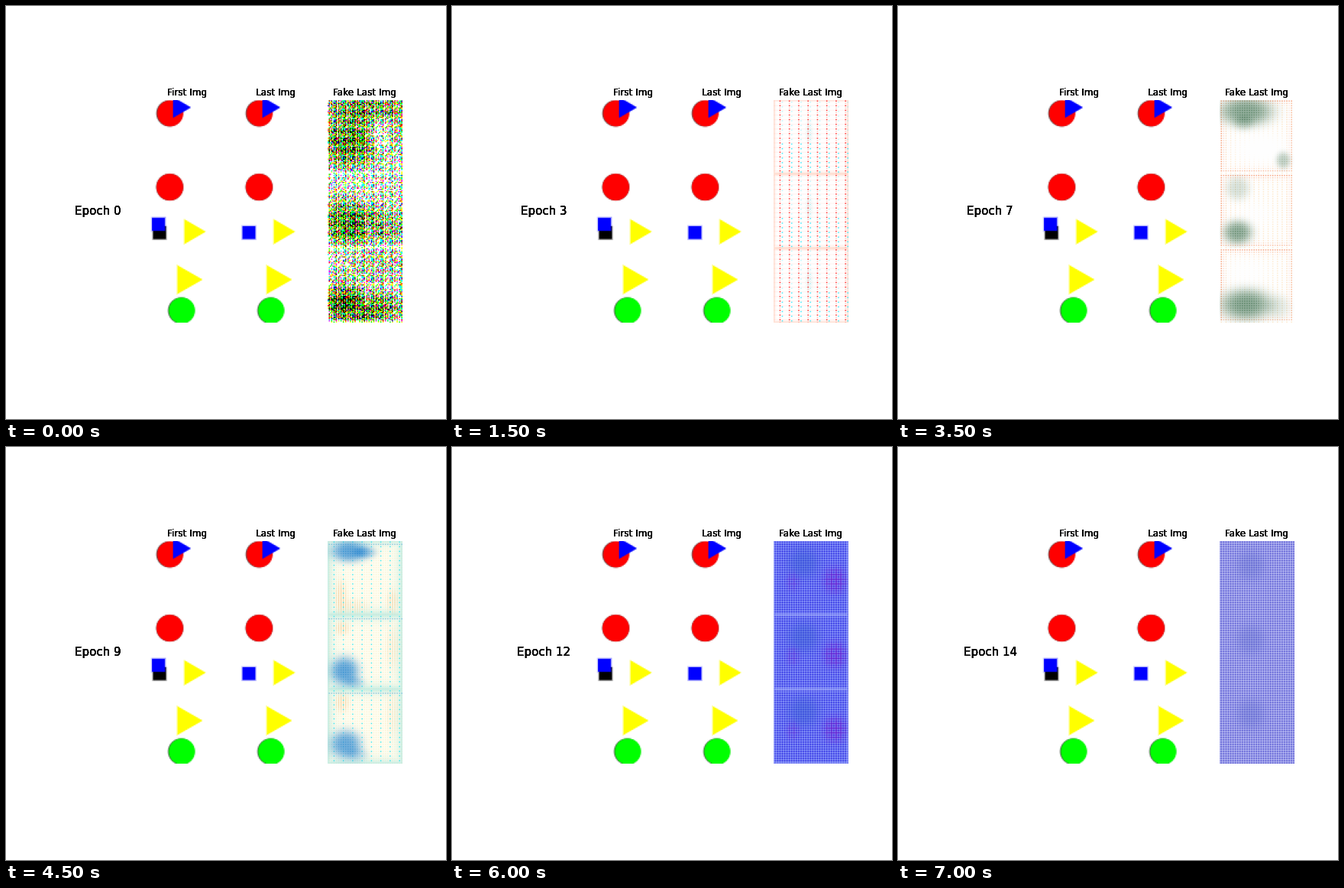
Write a matplotlib script that moves like this. It is 576 px wide and 540 px high and loops after 7500 ms.

```python
import numpy as np
import matplotlib.pyplot as plt
from matplotlib.animation import FuncAnimation

W, H, DPI = 576, 540, 72
N, EPOCHS = 64, 15
SIDE = 97.04
TOP = 123
PITCH = SIDE * 1.2
SCALE = SIDE / N

Y, X = np.mgrid[0:3 * N, 0:N]
V = Y % N
RED, GREEN, BLUE, YELLOW, BLACK = (1, 0, 0), (0, 1, 0), (0, 0, 1), (1, 1, 0), (0, 0, 0)


# --- shape column -----------------------------------------------------------
def paint(img, cover, color):
    c = np.clip(cover, 0, 1)[..., None]
    img[:] = img * (1 - c) + c * np.array(color, float)


def disc(img, x, y, r, color, shade=0.6):
    def cover(dx, rad):
        return rad + 0.5 - np.hypot(X + 0.5 - x - dx, Y + 0.5 - y)
    paint(img, np.clip(cover(-shade, r + 0.1), 0, 1) * 0.7, BLACK)
    paint(img, cover(0, r), color)


def square(img, x, y, s, color):
    dx = s / 2 + 0.5 - abs(X + 0.5 - x)
    dy = s / 2 + 0.5 - abs(Y + 0.5 - y)
    paint(img, np.minimum(dx, dy), color)


def triangle(img, x, y, w, h, color, top=0):
    """Pointing right; (x, y) is the middle of the left side."""
    px = X + 0.5 - x
    left = px + 0.5
    slant = (1 - px / w) * h / 2 - abs(Y + 0.5 - y) + 0.5
    paint(img, np.where(Y >= top, np.minimum(left, slant), 0), color)


def scene(first):
    img = np.ones((3 * N, N, 3))
    disc(img, 17.6, 12.1, 11.2, RED)
    triangle(img, 20, 7, 15.5, 18, BLUE)
    disc(img, 17.3, 75.5, 11.5, RED, 0.1)
    if first:
        square(img, 8.5, 114.7, 11.5, BLACK)
        square(img, 7.6, 107.4, 11.5, BLUE)
    else:
        square(img, 8.5, 114.6, 11.5, BLUE)
    triangle(img, 29.6, 113.8, 18.5, 21.6, YELLOW)
    triangle(img, 23.6, 155, 21.8, 25, YELLOW)
    disc(img, 27.6, 181.6, 11.2, GREEN)
    return img


# --- generated column -------------------------------------------------------
def field(*rows):
    """One list of (x, y, rx, ry, weight) soft blobs per cell."""
    out = np.zeros((3 * N, N))
    for i, blobs in enumerate(rows):
        for x, y, rx, ry, weight in blobs:
            d = ((X - x) / rx) ** 2 + ((V - y) / ry) ** 2
            out += weight * np.exp(-d ** 1.5) * (Y // N == i)
    return out


def grain(seed, size, rough=0.0):
    rng = np.random.default_rng(seed)
    tile = rng.random((size, size, 3))
    full = np.tile(tile, (3 * N // size, N // size, 1))
    return full + rough * rng.normal(size=full.shape)


def edge(width):
    d = np.minimum(np.minimum(X, N - 1 - X), np.minimum(V, N - 1 - V))
    return np.exp(-d / width)


def ink(img, amount, color):
    a = np.clip(amount, 0, 1)[..., None]
    return img * (1 - a) + a * np.array(color, float)


def confetti():
    dark = 0.24 + field(
        [(18, 36, 26, 22, 0.42), (30, 6, 36, 12, 0.3), (58, 22, 6, 22, 0.12), (43, 32, 8, 12, -0.2)],
        [(14, 42, 22, 20, 0.4), (45, 44, 26, 16, 0.22), (33, 46, 5, 8, -0.2)],
        [(28, 50, 36, 14, 0.42), (12, 40, 16, 16, 0.2), (40, 16, 24, 14, 0.1), (33, 42, 5, 7, -0.2)])
    weight = np.where(X[..., None] % 2 == 1, 1.25, 0.8) * np.array([0.92, 0.85, 1.25])
    off = dark[..., None] * weight > grain(4, 8, 0.12)
    corner = np.hypot(np.maximum(abs(X - 31.5) - 24, 0), np.maximum(abs(V - 29.5) - 24, 0)) > 8
    off[corner & (X % 2 == 0)] = False
    return 1.0 - off


def dotted():
    img = np.ones((3 * N, N, 3))
    img = ink(img, 0.3 * edge(0.8), (1, 0.6, 0.45))
    img = ink(img, 0.07 * (V % 4 == 1), (1, 0.5, 0.4))
    smudge = field(*[[(30, 28, 3, 10, 0.3)]] * 3)
    img = ink(img, smudge * ((X + Y) % 2), (0.6, 0.8, 0.8))
    img = ink(img, 0.9 * ((X % 8 == 5) & (V % 4 == 1)), (1, 0.1, 0.1))
    img = ink(img, 0.35 * ((X % 8 == 5) & (V % 4 == 3)), (1, 0.4, 0.3))
    low = 0.25 + 0.5 * (V > 34)
    return ink(img, low * ((X % 8 == 7) & (V % 4 == 2)), (0, 0.9, 1))


def olive():
    dark = field(
        [(16, 7, 24, 21, 1), (17, 35, 4, 3, 0.3)],
        [(16, 10, 23, 19, 1), (18, 42, 12, 22, 0.4)],
        [(17, 52, 24, 16, 1), (18, 27, 11, 10, 0.3), (20, 2, 30, 3, 0.2)])
    gap = np.where((X % 2 == 1) & (V % 2 == 1), 1.25, 0.6)
    strength = np.clip(dark * gap, 0, 1)[..., None]
    img = 1 - strength * grain(11, 4, 0.05) * np.array([0.85, 0.7, 1.0])
    img = ink(img, 0.4 * ((V == 1) & (X % 2 == 1)), (1, 0.4, 0.3))
    return ink(np.clip(img, 0, 1), 0.08 * edge(0.8), (1, 0.6, 0.5))


def moss():
    img = np.ones((3 * N, N, 3))
    pale = 0.3 + field([(36, 42, 26, 16, -0.3)], [(30, 34, 14, 12, -0.2)], [(22, 20, 20, 14, -0.25)])
    img = ink(img, pale * ((X % 4 == 1) & (V % 2 == 1)), (1, 0.72, 0.35))
    inside = (X < 62) & (V < 62)
    rim = edge(2.2) * inside * (X % 2 == 1) * (V % 2 == 1)
    img = ink(img, 0.9 * rim, (0.95, 0.4, 0.2))
    dark = field(
        [(22, 10, 22, 12, 0.75), (20, 20, 8, 6, 0.2), (54, 52, 6, 7, 0.4)],
        [(15, 12, 10, 10, 0.25), (15, 50, 12, 10, 0.72)],
        [(22, 48, 21, 13, 0.78), (50, 50, 10, 10, 0.15)])
    gap = np.where((X % 2 == 1) & (V % 2 == 1), 1.2, 0.8)
    return ink(img, dark * gap, (0.3, 0.48, 0.36))


def sky():
    img = np.ones((3 * N, N, 3)) * np.array([1, 0.995, 0.95])
    img = ink(img, 0.3 * ((X % 2 == 1) & (V % 2 == 1)), (0.98, 0.88, 0.6))
    img = ink(img, 0.5 * edge(3.5), (0.6, 0.88, 0.85))
    warm = field(
        [(11, 48, 5, 14, 0.5), (22, 56, 12, 6, 0.3), (55, 52, 5, 10, 0.4)],
        [(12, 11, 6, 6, 0.5), (55, 28, 6, 18, 0.25)],
        [(12, 11, 6, 8, 0.5), (55, 20, 6, 20, 0.2)])
    img = ink(img, warm * (X % 2), (0.95, 0.72, 0.45))
    img = ink(img, 0.55 * ((V == 3) & (X % 2 == 1)), (0.3, 0.65, 0.85))
    img = ink(img, 0.8 * ((X % 8 == 5) & (V % 4 == 1)), (0.1, 0.9, 0.95))
    dark = field(
        [(18, 9, 15, 9, 0.85), (32, 10, 9, 5, 0.4)],
        [(14, 48, 12, 12, 0.85), (23, 58, 8, 5, 0.3)],
        [(15, 47, 13, 12, 0.8), (25, 56, 9, 6, 0.25)])
    gap = np.where((X % 2 == 1) & (V % 2 == 1), 1.1, 0.85)
    return ink(img, dark * gap, (0.2, 0.55, 0.82))


def mesh(base, dot, line):
    img = np.ones((3 * N, N, 3)) * np.array(base, float)
    img = ink(img, 1.0 * ((X % 2 == 1) & (V % 2 == 1)), dot)
    return ink(img, 0.8 * ((X % 2 == 0) & (V % 2 == 0)), line)


def violet():
    img = mesh((0.4, 0.44, 0.96), (0.2, 0.2, 0.88), (0.62, 0.68, 0.98))
    img = ink(img, 0.45 * edge(0.7), (0.7, 0.75, 1))
    cool = field(*[[(25, 19, 13, 13, 0.45)]] * 3)
    img = ink(img, cool, (0.22, 0.38, 0.82))
    hot = field(*[[(52, 34, 10, 11, 0.75), (16, 35, 6, 8, 0.35)]] * 3)
    return ink(img, hot * np.where((X % 4 == 1) | (V % 4 == 1), 0.9, 0.3), (0.45, 0.08, 0.8))


def lavender():
    img = mesh((0.6, 0.61, 0.92), (0.36, 0.36, 0.82), (0.78, 0.79, 0.96))
    cool = field(*[[(26, 21, 12, 13, 0.35)]] * 3)
    return ink(img, cool, (0.38, 0.43, 0.8))


LOOKS = {0: confetti(), 3: dotted(), 5: olive(), 7: moss(), 9: sky(), 12: violet(), 14: lavender()}


def fake(epoch):
    lo = max(k for k in LOOKS if k <= epoch)
    hi = min(k for k in LOOKS if k >= epoch)
    t = (epoch - lo) / max(hi - lo, 1)
    return np.clip(LOOKS[lo] * (1 - t) + LOOKS[hi] * t, 0, 1)


# --- stage ------------------------------------------------------------------
fig = plt.figure(figsize=(W / DPI, H / DPI), dpi=DPI, facecolor="white")


def bold_text(x, y, text, size, **kw):
    """Stacked copies give the heavy, hard-edged lettering."""
    return [fig.text(x / W, 1 - y / H, text, fontsize=size, ha="center", **kw) for _ in range(5)]


def column(i, title, img):
    left = 72 + PITCH * i
    ax = fig.add_axes([left / W, 1 - (TOP + 3 * SIDE) / H, SIDE / W, 3 * SIDE / H])
    ax.axis("off")
    bold_text(left + SIDE / 2, TOP - 6, title, 12, va="baseline")
    return ax.imshow(img, aspect="auto")


column(1, "First Img", scene(True))
column(2, "Last Img", scene(False))
picture = column(3, "Fake Last Img", fake(0))
labels = bold_text(72 + SIDE / 2, TOP + 1.5 * SIDE, "Epoch 0", 15, va="center")


def update(epoch):
    picture.set_data(fake(epoch))
    for label in labels:
        label.set_text(f"Epoch {epoch}")
    return [picture, *labels]


anim = FuncAnimation(fig, update, frames=EPOCHS, interval=500, repeat=True, repeat_delay=0)
plt.show()
```
